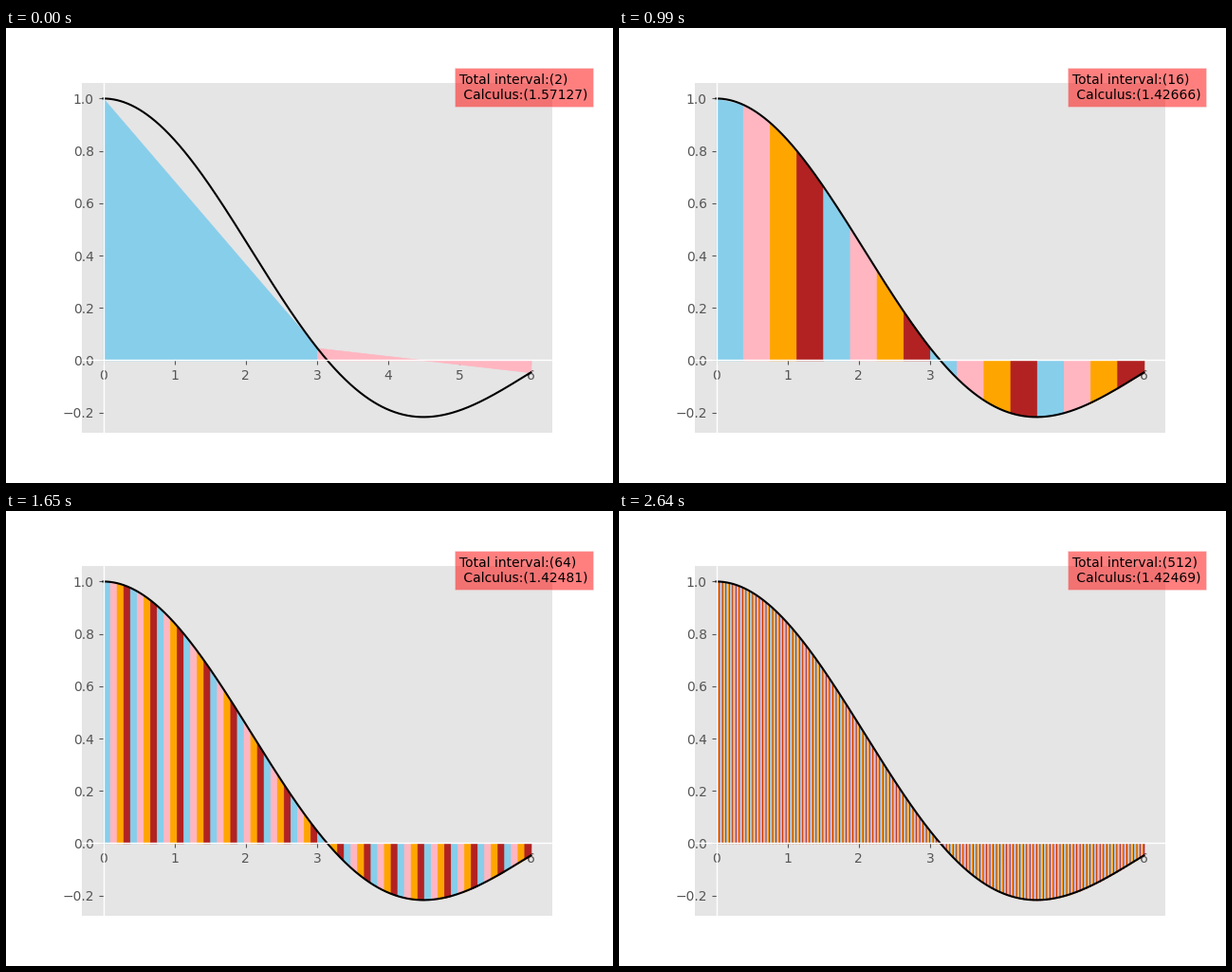
A matplotlib script for the animation above (2.97 s loop, 640 by 480 pixels).

```python
import itertools

import numpy as np
import matplotlib.pyplot as plt
from matplotlib.animation import FuncAnimation

END = 6
STEPS = 9
COLORS = ["skyblue", "lightpink", "orange", "firebrick"]


def f(x):
    """sin(x) / x, continuous at zero."""
    return np.sinc(x / np.pi)


plt.style.use("ggplot")
fig, ax = plt.subplots(figsize=(6.4, 4.8), dpi=100)
ax.grid(False)

xs = np.linspace(0, END, 1000)
ax.plot(xs, f(xs), color="black")
ax.set_xlim(ax.get_xlim())
ax.set_ylim(ax.get_ylim())

# Axes cross at the origin
for side in ("top", "right"):
    ax.spines[side].set_color("none")
for side in ("left", "bottom"):
    ax.spines[side].set_position(("data", 0))

label = ax.text(5, 1, "", bbox=dict(facecolor="red", alpha=0.5))
strips = []


def update(step):
    while strips:
        strips.pop().remove()
    count = 2 ** (step + 1)
    x = np.linspace(0, END, count + 1)
    y = f(x)
    for i, color in zip(range(count), itertools.cycle(COLORS)):
        strips.append(ax.fill_between(x[i:i + 2], y[i:i + 2], color=color))
    area = np.sum((y[:-1] + y[1:]) / 2) * END / count
    label.set_text(f"Total interval:({count})\n Calculus:({area:.5f})")
    return [*strips, label]


anim = FuncAnimation(fig, update, frames=STEPS, init_func=lambda: update(0),
                     interval=330, repeat=True, repeat_delay=0)
plt.show()
```
